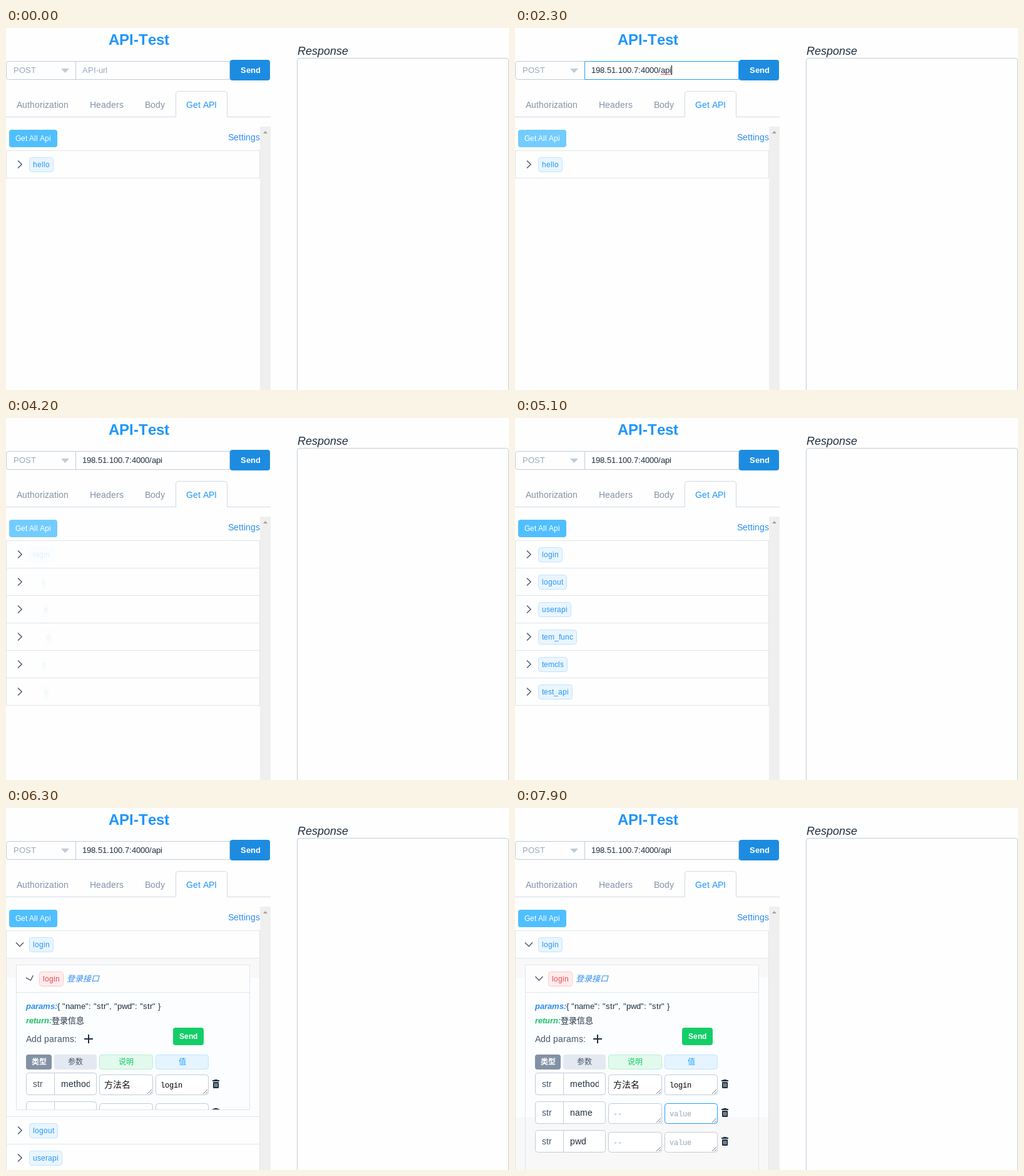
An HTML page with a canvas for the animation above (8 s loop, 804 px wide and 580 px high).

```html
<!DOCTYPE html>
<html lang="en">
<head>
<meta charset="utf-8">
<title>API-Test</title>
<style>
html, body { margin: 0; width: 100%; height: 100%; overflow: hidden; background: #fefefe; }
canvas { display: block; }
</style>
</head>
<body>
<canvas id="stage" width="804" height="580"></canvas>
<script>
const ctx = document.getElementById('stage').getContext('2d');
const SANS = '"Liberation Sans", "Noto Sans CJK SC", "Noto Sans CJK", sans-serif';
const MONO = '"Liberation Mono", "Noto Sans CJK SC", monospace';
const LOOP = 8000, STEP = 100;
const URL_TEXT = '198.51.100.7:4000/api';
const C = {
  page: '#fefefe', line: '#dfe6ec', field: '#c0ccda', hover: '#8391a5', blue: '#20a0ff',
  ink: '#1f2d3d', soft: '#475669', hint: '#97a8be', tab: '#8492a6', green: '#13ce66'
};
const ITEMS = [['login', 39], ['logout', 46], ['userapi', 53], ['tem_func', 62], ['temcls', 47], ['test_api', 55]];
const PARAMS = [['str', 'method', '方法名', 'login'], ['str', 'name'], ['str', 'pwd']];

const clamp = v => Math.max(0, Math.min(1, v));
const span = (t, from, len) => clamp((t - from) / len);

function bezier(x1, y1, x2, y2) {
  const at = (a, b, u) => 3 * a * u * (1 - u) ** 2 + 3 * b * u * u * (1 - u) + u ** 3;
  return x => {
    if (x <= 0 || x >= 1) return clamp(x);
    let lo = 0, hi = 1;
    for (let i = 0; i < 24; i++) {
      const mid = (lo + hi) / 2;
      if (at(x1, x2, mid) < x) lo = mid; else hi = mid;
    }
    return at(y1, y2, lo);
  };
}
const ease = bezier(.25, .1, .25, 1);
const inOut = bezier(.42, 0, .58, 1);
const zoom = bezier(.23, 1, .32, 1);

function mix(a, b, k) {
  const part = (s, i) => parseInt(s.slice(i, i + 2), 16);
  return 'rgb(' + [1, 3, 5].map(i => Math.round(part(a, i) + (part(b, i) - part(a, i)) * k)) + ')';
}

function rect(x, y, w, h, fill) {
  ctx.fillStyle = fill;
  ctx.fillRect(x, y, w, h);
}

function box(x, y, w, h, fill, stroke, r = 4) {
  ctx.beginPath();
  if (stroke) ctx.roundRect(x + .5, y + .5, w - 1, h - 1, r);
  else ctx.roundRect(x, y, w, h, r);
  if (fill) { ctx.fillStyle = fill; ctx.fill(); }
  if (stroke) { ctx.strokeStyle = stroke; ctx.lineWidth = 1; ctx.stroke(); }
}

function path(points, color, width = 1) {
  ctx.beginPath();
  points.forEach(([x, y]) => ctx.lineTo(x, y));
  ctx.strokeStyle = color;
  ctx.lineWidth = width;
  ctx.stroke();
}

// Glyphs advance by whole pixels, like hinted screen text.
const advance = ch => Math.round(ctx.measureText(ch).width + .01);

function text(str, x, y, size, color, style = '', family = SANS) {
  ctx.font = `${style} ${size}px ${family}`;
  ctx.fillStyle = color;
  for (const ch of str) {
    ctx.fillText(ch, x, y);
    x += advance(ch);
  }
  return x;
}

function clipped(x, y, w, h, draw) {
  ctx.save();
  ctx.beginPath();
  ctx.rect(x, y, w, h);
  ctx.clip();
  draw();
  ctx.restore();
}

function chevron(x, y, turn) {
  ctx.save();
  ctx.translate(x, y);
  ctx.rotate(turn * Math.PI / 2);
  path([[-3, -6], [3.2, 0], [-3, 6]], C.soft, 1.4);
  ctx.restore();
}

function tag(label, x, y, w, red, alpha = 1, scale = 1) {
  ctx.save();
  ctx.globalAlpha = alpha;
  ctx.translate(x + w / 2, 0);
  ctx.scale(scale, 1);
  ctx.translate(-x - w / 2, 0);
  box(x, y, w, 24, red ? '#ffeded' : '#e9f5ff', red ? '#ffc8c8' : '#c1e4ff');
  text(label, x + 6, y + 16, 12, red ? '#f04452' : '#2697f5');
  ctx.restore();
}

function caret(x, y, h) { rect(x, y, 1, h, '#000'); }

function urlBorder(t) {
  if (t < 200) return C.field;
  if (t < 400) return C.hover;
  if (t < 2800) return mix(C.hover, C.blue, span(t, 350, 300));
  return mix(C.blue, C.field, ease(span(t, 2750, 250)));
}

function header(t) {
  text('API-Test', 164, 27, 24, '#2196fb', 'bold');
  text('Response', 466, 43, 18, C.ink, 'italic');
  box(465, 48, 339, 560, null, C.field);

  box(0, 53, 364, 30, null, C.field);
  text('POST', 12, 72, 13, C.hint);
  ctx.beginPath();
  ctx.moveTo(88, 65); ctx.lineTo(101, 65); ctx.lineTo(94.5, 72);
  ctx.fillStyle = '#bfcbd9';
  ctx.fill();
  box(111, 53, 247, 30, null, urlBorder(t), 0);

  const filled = t >= 1300;
  if (filled) text(URL_TEXT, 122, 72, 13, C.ink);
  else text('API-url', 122, 72, 13, C.hint);
  if (t >= 1900 && t < 2800) {
    const wave = Array.from({ length: 10 }, (_, i) => [233 + i * 2, 73.5 + i % 2 * 1.5]);
    path(wave, '#e84040');
  }
  if ((t >= 600 && t < 1100) || (t >= 1300 && t < 1800) || (t >= 2300 && t < 2800)) {
    caret(filled ? 250 : 122, 60, 15);
  }
  box(358, 51, 64, 33, '#1d8ce0');
  text('Send', 375, 72, 13, '#fff', 'bold');

  path([[0, 142.5], [271.5, 142.5], [271.5, 105], [272.5, 102.5], [275, 101.5], [350, 101.5],
    [352.5, 102.5], [353.5, 105], [353.5, 142.5], [423, 142.5]], '#d1dbe5');
  text('Authorization', 17, 128, 14, C.tab);
  text('Headers', 134, 128, 14, C.tab);
  text('Body', 222, 128, 14, C.tab);
  text('Get API', 288, 128, 14, '#2196fb');
}

function toolbar(t) {
  let color = '#50bfff';
  if (t >= 2800 && t < 2900) color = '#48ace6';
  else if (t < 5100) color = mix('#50bfff', '#73ccff', span(t, 1900, 300));
  box(5, 163, 77, 28, color);
  text('Get All Api', 15, 181, 12, '#fff');
  text('Settings', 355, 180, 14, '#2d8cf0');

  rect(406, 158, 17, 422, '#f0eff0');
  ctx.beginPath();
  ctx.moveTo(411, 169); ctx.lineTo(418, 169); ctx.lineTo(414.5, 165);
  ctx.fillStyle = '#a0a0a0';
  ctx.fill();
}

function label(str, x, w, fill, stroke, color, style) {
  box(x, 395, w, 24, fill, stroke);
  text(str, Math.round(x + (w - str.length * 12) / 2), 411, 12, color, style);
}

function area(x, y, value, hint, border = C.field) {
  box(x, y, 86 - (x > 200), 33, '#fff', border);
  const right = x + 84 - (x > 200), low = y + 31;
  path([[right - 7, low], [right, low - 7]], '#777');
  path([[right - 3, low], [right, low - 3]], '#777');
  if (!value) text(hint, x + 8, y + 21, 12, C.hint, '', MONO);
  else if (value === 'login') text(value, x + 8, y + 21, 12, '#000', '', MONO);
  else text(value, x + 8, y + 21, 14, '#111');
}

function trash(x, y) {
  rect(x + 3, y, 5, 1, C.ink);
  rect(x, y + 1, 11, 2, C.ink);
  box(x + 1, y + 4, 9, 10, C.ink, null, 1);
  for (const dx of [3, 5, 7]) rect(x + dx, y + 6, 1, 6, '#c5cad0');
}

function paramRow([type, name, note, value], i, t) {
  const y = 424 + 46 * i;
  box(32, y, 113, 36, '#fff', C.field);
  rect(77, y, 1, 36, C.field);
  text(type, 43, y + 23, 14, C.soft);
  clipped(78, y, 56, 36, () => text(name, 88, y + 23, 14, C.ink));
  area(149, y + 3, note, '--');
  let border = C.field;
  if (i === 1) {
    border = t < 7400 ? mix(C.field, C.hover, span(t, 6850, 250)) : mix(C.hover, C.blue, span(t, 7350, 150));
  }
  area(239, y + 3, value, 'value', border);
  if (i === 1 && t >= 7400 && t < 7900) caret(247, 482, 14);
  trash(330, y + 11);
}

function details(t) {
  let x = text('params:', 32, 322, 13, '#2d8cf0', 'italic bold');
  text('{ "name": "str", "pwd": "str" }', x, 322, 13, C.ink);
  x = text('return:', 32, 345, 13, '#1fc068', 'italic bold');
  text('登录信息', x, 345, 13, C.ink);
  text('Add params:', 32, 375, 14, C.soft);
  rect(125, 369, 14, 2, C.ink);
  rect(131, 363, 2, 14, C.ink);
  box(267, 352, 49, 28, C.green);
  text('Send', 277, 370, 12, '#fff', 'bold');

  label('类型', 32, 41, '#8391a5', null, '#fff', 'bold');
  label('参数', 77, 68, '#e4e8f1', null, '#48576a');
  label('说明', 149, 86, '#e2f9ed', '#b8f0d1', C.green);
  label('值', 239, 85, '#e5f4ff', '#c0e4ff', C.blue);
  PARAMS.forEach((row, i) => paramRow(row, i, t));
}

function openBody(t, height, inner) {
  clipped(1, 241, 404, height - 1, () => {
    rect(1, 241, 404, 31, '#f8f8f9');
    rect(1, 272, 404, 223, '#fbfdff');
    rect(1, 495, 404, 85, '#f8f8f8');
    rect(16, 251, 374, 45, '#fdfdfe');
    chevron(38.5, 273, ease(span(t, 6150, 300)));
    const show = zoom(span(t, 5191, 300));
    tag('login', 53, 262, 39, true, show, show);
    text('登录接口', 97, 278, 13, '#2d8cf0', 'italic');
    clipped(16, 296, 374, inner, () => details(t));
    rect(16, 295, 374, 1, C.line);
    box(16, 251, 374, 46 + inner, null, C.line, 0);
  });
}

function list(t) {
  const loaded = t >= 4200;
  const items = loaded ? ITEMS : [['hello', 39]];
  const show = loaded ? zoom(span(t, 4191, 300)) : 1;
  const inner = Math.round(374 * inOut(span(t, 6150, 300)));
  const height = Math.round(67 * inOut(span(t, 5150, 300))) + inner;
  let y = 196;
  items.forEach(([name, w], i) => {
    rect(0, y, 406, 1, C.line);
    chevron(22, y + 22.5, i ? 0 : ease(span(t, 5150, 300)));
    tag(name, 37, y + 11, w, false, show, i ? show : 1);
    y += 44;
    if (!i && height) {
      rect(0, y, 406, 1, C.line);
      openBody(t, height, inner);
      y += height;
    }
  });
  rect(0, y, 406, 1, C.line);
  rect(0, 196, 1, y - 196, C.line);
  rect(405, 196, 1, y - 196, C.line);
}

function frame() {
  const t = Math.floor(performance.now() % LOOP / STEP) * STEP;
  rect(0, 0, 804, 580, C.page);
  header(t);
  list(t);
  toolbar(t);
  requestAnimationFrame(frame);
}
frame();
</script>
</body>
</html>
```
